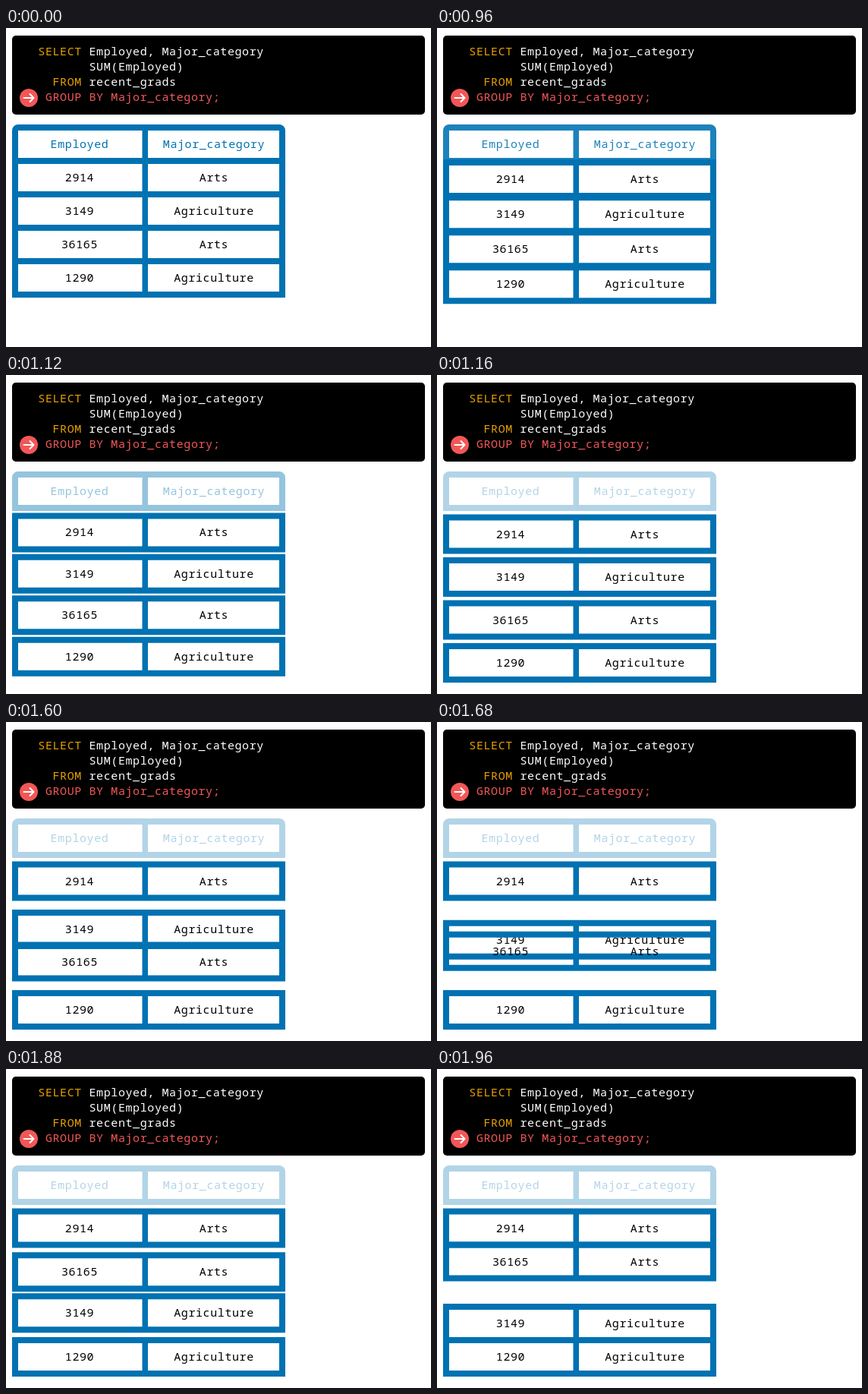
These frames come from a looping animation (560 by 420 pixels, 3 s). An HTML page:

```html
<!DOCTYPE html>
<html lang="en">
<head>
<meta charset="utf-8">
<title>GROUP BY</title>
<style>
  html, body { margin: 0; width: 100%; height: 100%; overflow: hidden; background: #fff; }
  svg { display: block; width: 560px; height: 420px; }
  text { font: 15px "Noto Sans Mono", "Liberation Mono", monospace; letter-spacing: .6px; }

  .code { fill: #fff; }
  .key { fill: #e69f00; }
  .now { fill: #f25757; }
  .arrow { fill: none; stroke: #fff; stroke-width: 2; stroke-linecap: round; stroke-linejoin: round; }

  .frame { fill: #0072b2; fill-rule: evenodd; }
  .cells { text-anchor: middle; }
  .head text { fill: #0072b2; }
  .head { animation: fade 3s infinite; }
  .row { animation: regroup 3s infinite; }

  /* --apart: shift once the rows split; --end: shift once they are grouped */
  .r0 { --apart: 12.5px; --end: 12.5px; }
  .r1 { --apart: 25px; --end: 94px; }
  .r2 { --apart: 37.5px; --end: -31.5px; }
  .r3 { --apart: 50px; --end: 50px; }

  @keyframes fade {
    0% { opacity: 1; }
    31.99% { opacity: 1; animation-timing-function: steps(6, start); }
    39.99%, 100% { opacity: .3; }
  }
  @keyframes regroup {
    0% { translate: 0 0; }
    31.99% { translate: 0 0; animation-timing-function: steps(6, start); }
    39.99% { translate: 0 var(--apart); }
    53.323% { translate: 0 var(--apart); animation-timing-function: steps(10, start); }
    66.656%, 100% { translate: 0 var(--end); }
  }
</style>
</head>
<body>
<svg viewBox="0 0 560 420">
  <defs>
    <path id="frame" class="frame" d="M8 0H368V52H8ZM16 8V44H179.500V8ZM187 8V44H360V8Z"/>
  </defs>

  <rect x="8" y="10" width="544" height="104" rx="5"/>
  <g class="code">
    <text x="42.300" y="36" class="key">SELECT</text>
    <text x="109.500" y="36">Employed, Major_category</text>
    <text x="109.500" y="56">SUM(Employed)</text>
    <text x="61.500" y="76" class="key">FROM</text>
    <text x="109.500" y="76">recent_grads</text>
    <text x="51.900" y="96" class="now">GROUP BY Major_category;</text>
  </g>
  <circle class="now" cx="30" cy="92" r="12"/>
  <path class="arrow" d="M23.500 92H36.500M31.500 87L36.500 92L31.500 97"/>

  <g class="cells">
    <g class="head" transform="translate(0 127)">
      <path class="frame" d="M8 52V8A8 8 0 0 1 16 0H360A8 8 0 0 1 368 8V52ZM16 8V44H179.500V8ZM187 8V44H360V8Z"/>
      <text x="97" y="30.500">Employed</text>
      <text x="274" y="30.500">Major_category</text>
    </g>
    <g class="row r0" transform="translate(0 171)">
      <use href="#frame"/><text x="97" y="31">2914</text><text x="274" y="31">Arts</text>
    </g>
    <g class="row r1" transform="translate(0 215)">
      <use href="#frame"/><text x="97" y="31">3149</text><text x="274" y="31">Agriculture</text>
    </g>
    <g class="row r2" transform="translate(0 259)">
      <use href="#frame"/><text x="97" y="31">36165</text><text x="274" y="31">Arts</text>
    </g>
    <g class="row r3" transform="translate(0 303)">
      <use href="#frame"/><text x="97" y="31">1290</text><text x="274" y="31">Agriculture</text>
    </g>
  </g>
</svg>
</body>
</html>
```
